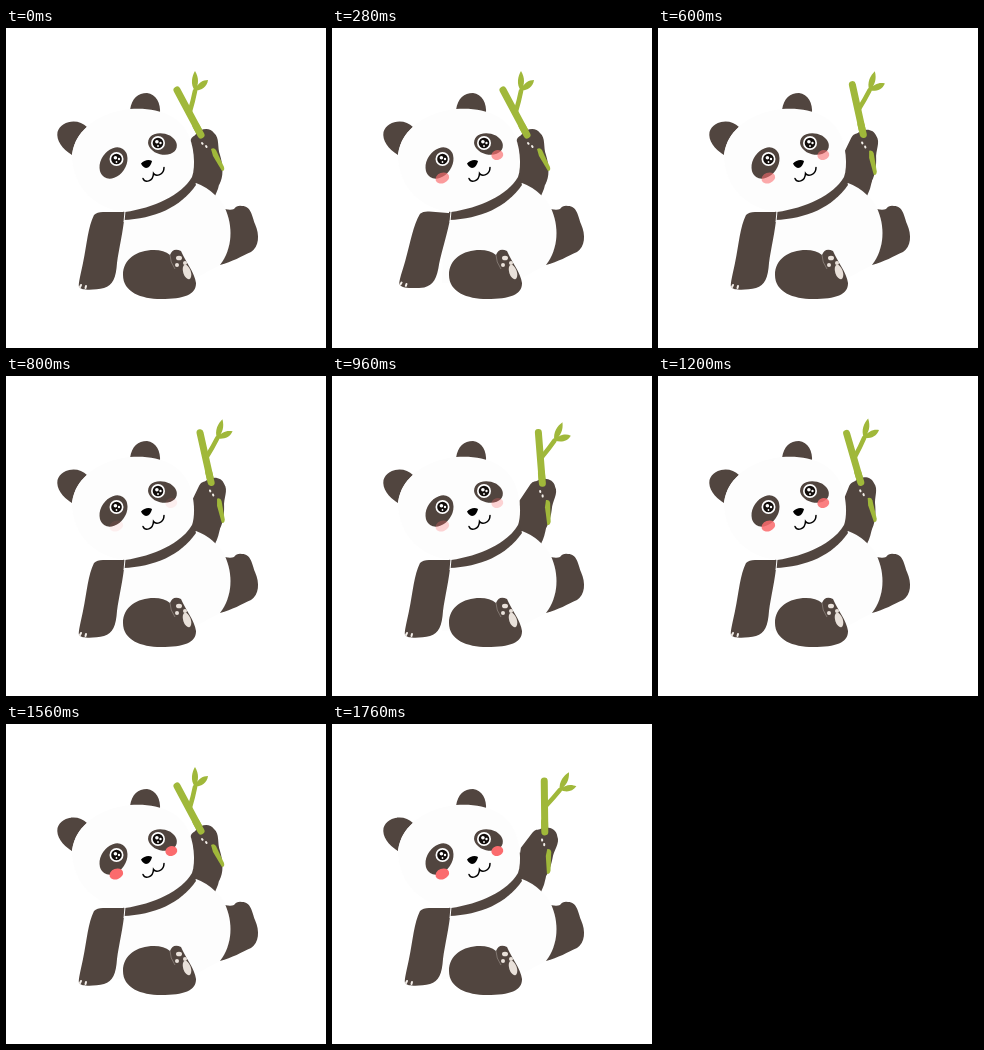
An HTML page that plays this animation: 320x320 px, repeating every 1.92 s.

```html
<!DOCTYPE html>
<html lang="en">
<head>
<meta charset="utf-8">
<title>Waving panda</title>
<style>
html, body { margin: 0; width: 100%; height: 100%; overflow: hidden; background: #fff; }
svg { display: block; width: 100vw; height: 100vh; }
.dark { fill: #51453f; }
.white { fill: #fdfdfd; }
.green { fill: #a0b83a; }
.stem { fill: none; stroke: #a0b83a; stroke-linecap: round; }
.claw { fill: none; stroke: #f4efea; stroke-width: 2; stroke-linecap: round; }
.pad { fill: #e9e1da; }
</style>
</head>
<body>
<svg viewBox="0 0 320 320">
  <!-- ears and far leg -->
  <g class="dark">
    <path d="M66 127C56 121 50 112 51.500 104C55 92 73 90 81 99C73 106 68 113 66 127Z"/>
    <path d="M124 82C126 70 132 65 141 65C150 66 155 75 154 86C145 82 135 81 124 82Z"/>
    <path d="M215 180Q224 183 228 181Q231 177 236 178C245 178 246 188 249 196C254 207 253 219 245 224C236 228 226 234 214 237Z"/>
    <path d="M186 128L214 138Q216 154 209 168L184 158Z"/>
  </g>

  <!-- raised arm with bamboo -->
  <g id="arm">
    <path class="stem" stroke-width="7" stroke-linecap="butt" d="M171 62L195 107"/>
    <path class="stem" stroke-width="4.600" d="M184 83Q187 73 189 63"/>
    <path class="green" d="M189 63C184 56 186 48 189 43C193 50 193 56 189 63ZM189 63C191 55 197 52 202 52C201 59 196 62 189 63Z"/>
    <path class="dark" d="M184 115C185 108 188 109 190 106C195 100 204 99 208 105C214 110 211 119 214 127C217 137 218 149 213 157L190 158L181 132Z"/>
    <path class="stem" stroke-width="7" d="M190 98L195 107"/>
    <path class="green" d="M205 121Q208 119 210 122L218 139Q219 143 216 143L207 128Z"/>
    <path class="claw" d="M196 115l.6 .8M200 118l.6 1"/>
  </g>

  <!-- body, collar and head -->
  <path class="white" d="M112 188L190 155Q201 159 209 167Q216 174 219 180C227 198 227 220 214 237L180 255L110 255Z"/>
  <path class="dark" d="M117 180L180 140L188 150L190 157C175 179 148 191 117 192Z"/>
  <path class="white" d="M66 126C70 100 95 84 124 81C155 79 172 89 181 104C188 116 190 138 186 149C176 167 147 180 119 184C90 181 66 160 66 126Z"/>

  <!-- resting arm -->
  <g id="paw">
    <path class="dark" d="M88 187Q91 184 97 184L119 184C117 205 113 220 111 235C110 250 107 257 98 260C89 262 76 263 73 259C72 256 75 245 77 235C81 215 82 199 88 187Z"/>
    <path class="claw" d="M75 257l-1 2M80 258l-.5 2"/>
  </g>
  <path fill="none" stroke="#fdfdfd" d="M119 183L118 194"/>

  <!-- near foot -->
  <path class="dark" d="M117 247C117 231 131 222 148 222Q158 222 164 227Q167 219 175 223C179 233 189 245 190 255C190 267 178 271 155 271C135 271 117 264 117 247Z"/>
  <path fill="none" stroke="#8b807a" stroke-width=".8" d="M164 227Q164 234 169 241"/>
  <g class="pad">
    <ellipse cx="173" cy="230" rx="3" ry="2.3"/>
    <circle cx="171" cy="237" r="2"/>
    <circle cx="179" cy="235" r="2"/>
    <ellipse cx="181" cy="244" rx="3.8" ry="7.5" transform="rotate(-18 181 244)"/>
  </g>

  <!-- face -->
  <ellipse class="dark" cx="107.5" cy="135" rx="12.5" ry="16.8" transform="rotate(34 107.5 135)"/>
  <ellipse class="dark" cx="156.5" cy="116" rx="14.6" ry="10.5" transform="rotate(14 156.5 116)"/>
  <g id="eye">
    <circle cx="110.5" cy="131" r="7" fill="#fff"/>
    <circle cx="110.5" cy="131" r="5.3" fill="#120d0b"/>
    <circle cx="109.4" cy="129.8" r="1.8" fill="#fff"/>
    <circle cx="113" cy="131" r="1.2" fill="#fff"/>
    <circle cx="110.5" cy="134" r=".9" fill="#fff"/>
  </g>
  <use href="#eye" x="41.5" y="-16"/>
  <path d="M135 135.500C138 132 143 131 146 133C145 137 143 140 140 140C138 139.500 136 138 135 135.500Z"/>
  <path fill="none" stroke="#000" stroke-width="1.5" stroke-linecap="round" d="M137 150.500C139 155 147 154 147.500 145.500C150 149 158 147 158 139.500"/>
  <g id="cheeks" fill="#fb6b6d">
    <ellipse cx="110.3" cy="150" rx="7" ry="5.2" transform="rotate(-20 110.3 150)"/>
    <ellipse cx="165.3" cy="127" rx="6" ry="5" transform="rotate(-15 165.3 127)"/>
  </g>
</svg>
<script>
const LOOP = 1920, STEP = 40, LAST = 1760;
const WAVE = 420, WAVE_START = 300, PAW_END = 345;
const [arm, paw, cheeks] = ['arm', 'paw', 'cheeks'].map(id => document.getElementById(id));

// Position within a cycle: 0 to 1 out, 1 to 2 back.
const phase = x => 2 * (x - Math.floor(x));
const swing = x => 1 - Math.abs(1 - phase(x));
const turn = (el, deg, x, y) => el.setAttribute('transform', `rotate(${deg} ${x} ${y})`);

// The bamboo leaves quickly, slows at the far end and returns evenly.
function wave(t) {
  if (t < WAVE_START) return 0;
  const p = phase((t - WAVE_START) / WAVE);
  return p < 1 ? Math.sin(p * Math.PI / 2) : 2 - p;
}

function draw(now) {
  const t = Math.min(LAST, Math.floor(now % LOOP / STEP) * STEP);
  turn(arm, 27.5 * wave(t), 202, 144);
  turn(paw, t < PAW_END ? 12 * swing(t / PAW_END) : 0, 103, 187);
  cheeks.setAttribute('opacity', t < 3 * WAVE ? swing(t / (2 * WAVE)) : 1);
}

let start;
function tick(now) {
  start ??= now;
  draw(now - start);
  requestAnimationFrame(tick);
}
draw(0);
requestAnimationFrame(tick);
</script>
</body>
</html>
```
